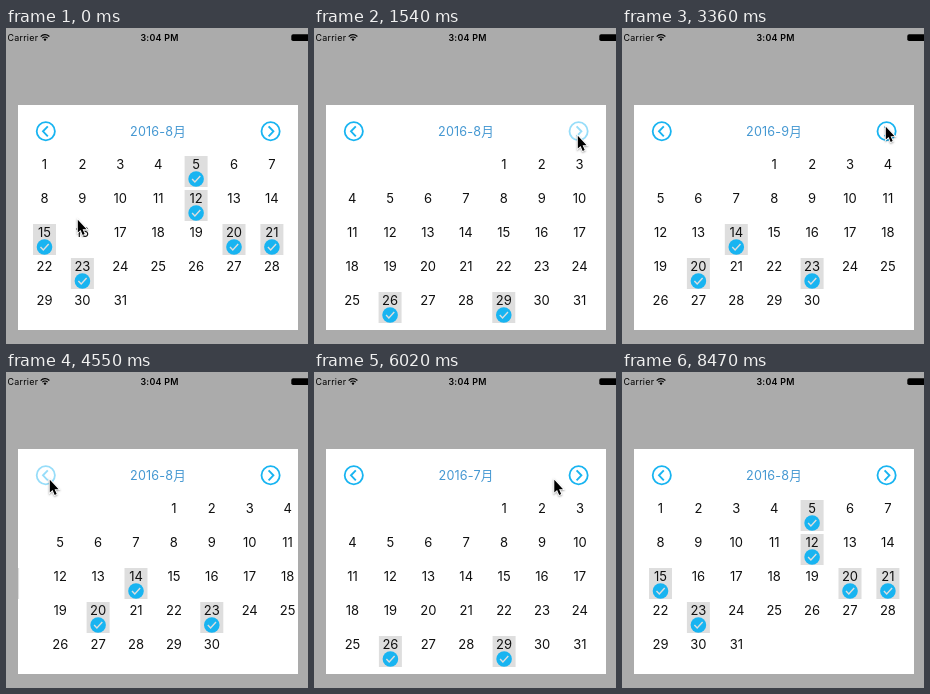
These frames come from a looping animation (302 px wide and 316 px high, 8.54 s). An HTML page with a canvas:

```html
<!DOCTYPE html>
<html lang="zh">
<head>
<meta charset="utf-8">
<title>Calendar</title>
<style>
  html, body { margin: 0; width: 100%; height: 100%; overflow: hidden; background: #ababab; }
  canvas { display: block; width: 302px; height: 316px; }
</style>
</head>
<body>
<canvas id="stage"></canvas>
<script>
const W = 302, H = 316, LOOP = 8540, STEP = 70;
const PANEL = { x: 12, y: 77, w: 280, h: 225 };
const COL = 37.9, ROW = 34;
const BLUE = '#18b4f1', GREY = '#dedede';
const FONT = 'Inter, "Noto Sans CJK SC", "Noto Sans CJK JP", "Noto Sans CJK", sans-serif';
const SLIDE = 460, PRESS = 140, HOLD = 300, FADE = 150, SETTLE = 80;
const FIRST_MONTH = 8;

const marked = { 7: [26, 29], 8: [5, 12, 15, 20, 21, 23], 9: [14, 20, 23] };

// Each click turns the page by dir, starting from the month before it
let current = FIRST_MONTH;
const click = (at, dir) => {
  const from = current;
  current += dir;
  return { at, dir, from };
};
const clicks = [
  click(300, -1), click(1530, 1), click(2800, 1),
  click(4480, -1), click(5327, -1), click(6605, 1)
];

// The pointer rests on the arrow around each click and wanders in between
const stop = (t, x, y) => ({ t, x, y });
const rest = (t, dir) => stop(t, 153 + 110 * dir, 107);
const path = clicks
  .flatMap(c => [rest(c.at - PRESS - SETTLE, c.dir), rest(c.at + HOLD, c.dir)])
  .concat([
    stop(0, 71, 191), stop(840, 240, 196), stop(2310, 253, 202), stop(3360, 263, 98),
    stop(6090, 251, 107), stop(7980, 264, 240), stop(8400, 16, 6)
  ])
  .sort((a, b) => a.t - b.t);

const canvas = document.getElementById('stage');
const ctx = canvas.getContext('2d');
const ratio = window.devicePixelRatio || 1;
canvas.width = W * ratio;
canvas.height = H * ratio;
ctx.scale(ratio, ratio);

const clamp = v => Math.max(0, Math.min(1, v));
const ease = p => (1 - Math.cos(Math.PI * clamp(p))) / 2;
const mix = (a, b, p) => a + (b - a) * p;

function text(str, x, y, size, color, align = 'center', weight = 400, spacing = 0) {
  ctx.font = `${weight} ${size}px ${FONT}`;
  ctx.letterSpacing = `${spacing}px`;
  ctx.fillStyle = color;
  ctx.textAlign = align;
  ctx.fillText(str, x, y);
}

function line(points, color, width) {
  ctx.beginPath();
  points.forEach(([x, y]) => ctx.lineTo(x, y));
  ctx.strokeStyle = color;
  ctx.lineWidth = width;
  ctx.stroke();
}

function disc(x, y, r, color) {
  ctx.beginPath();
  ctx.arc(x, y, r, 0, Math.PI * 2);
  ctx.fillStyle = color;
  ctx.fill();
}

function statusBar() {
  text('Carrier', 1.5, 13, 8.9, '#000', 'left', 400, 0.25);
  text('3:04 PM', 153.5, 13, 8.9, '#000', 'center', 600, 0.25);
  ctx.strokeStyle = '#000';
  ctx.lineWidth = 1.2;
  for (const r of [3.6, 5.9]) {
    ctx.beginPath();
    ctx.arc(39, 12.6, r, -Math.PI * 0.76, -Math.PI * 0.24);
    ctx.stroke();
  }
  disc(39, 11.6, 1.2, '#000');
  ctx.fillStyle = '#000';
  ctx.beginPath();
  ctx.roundRect(285.3, 6.3, 20, 6.7, 1.8);
  ctx.fill();
}

function dayMark(x, top) {
  ctx.fillStyle = GREY;
  ctx.fillRect(x - 11.5, top, 23, 31);
  const y = top + 23;
  disc(x, y, 7.8, BLUE);
  line([[x - 4, y], [x - 1.2, y + 3], [x + 4.2, y - 3]], GREY, 1.4);
}

function month(m, shift) {
  const first = (new Date(2016, m - 1, 1).getDay() + 6) % 7;
  const days = new Date(2016, m, 0).getDate();
  for (let d = 1; d <= days; d++) {
    const cell = first + d - 1;
    const x = 38.5 + (cell % 7) * COL + shift;
    const top = 128 + Math.floor(cell / 7) * ROW;
    if (marked[m].includes(d)) dayMark(x, top);
    text(d, x, top + 12.8, 13, '#111');
  }
}

function arrow(dir, alpha) {
  const x = 152.2 + 112.4 * dir, y = 103.3;
  ctx.globalAlpha = alpha;
  ctx.beginPath();
  ctx.arc(x, y, 9.1, 0, Math.PI * 2);
  ctx.strokeStyle = BLUE;
  ctx.lineWidth = 1.8;
  ctx.stroke();
  line([[x - 2 * dir, y - 5], [x + 2.8 * dir, y], [x - 2 * dir, y + 5]], BLUE, 1.9);
  ctx.globalAlpha = 1;
}

function arrowAlpha(t, dir) {
  const hit = clicks.find(c => c.dir === dir && t >= c.at - PRESS && t < c.at + HOLD + FADE);
  return hit ? mix(0.45, 1, clamp((t - hit.at - HOLD) / FADE)) : 1;
}

function calendar(t) {
  ctx.fillStyle = '#fff';
  ctx.fillRect(PANEL.x, PANEL.y, PANEL.w, PANEL.h);
  const last = clicks.filter(c => c.at <= t).pop();
  const shown = last ? last.from + last.dir : FIRST_MONTH;

  for (const dir of [-1, 1]) arrow(dir, arrowAlpha(t, dir));
  text(`2016-${shown}月`, 152, 108, 12.6, '#4598d2', 'center', 400, 0.15);

  ctx.save();
  ctx.beginPath();
  ctx.rect(PANEL.x, PANEL.y, PANEL.w, PANEL.h);
  ctx.clip();
  const p = last ? ease((t - last.at) / SLIDE) : 1;
  if (p < 1) month(last.from, -last.dir * p * PANEL.w);
  month(shown, last ? last.dir * (1 - p) * PANEL.w : 0);
  ctx.restore();
}

function pointer(t) {
  const i = path.findIndex(s => s.t > t);
  if (i < 0) return;
  const a = path[i - 1], b = path[i];
  const p = ease((t - a.t) / (b.t - a.t));
  ctx.save();
  ctx.translate(mix(a.x, b.x, p), mix(a.y, b.y, p));
  const shape = new Path2D('M.8 .8V13.4L3.6 10.9 5.7 15.9 7.7 15 5.6 10.2H9.6Z');
  ctx.shadowColor = 'rgba(0, 0, 0, 0.35)';
  ctx.shadowBlur = 2 * ratio;
  ctx.shadowOffsetY = ratio;
  ctx.strokeStyle = '#fff';
  ctx.lineWidth = 1.8;
  ctx.stroke(shape);
  ctx.shadowColor = 'transparent';
  ctx.fillStyle = '#000';
  ctx.fill(shape);
  ctx.restore();
}

function draw(t) {
  ctx.fillStyle = '#ababab';
  ctx.fillRect(0, 0, W, H);
  statusBar();
  calendar(t);
  pointer(t);
}

const start = performance.now();
function tick() {
  const t = (performance.now() - start) % LOOP;
  draw(Math.floor(t / STEP) * STEP);
  requestAnimationFrame(tick);
}
tick();
</script>
</body>
</html>
```
